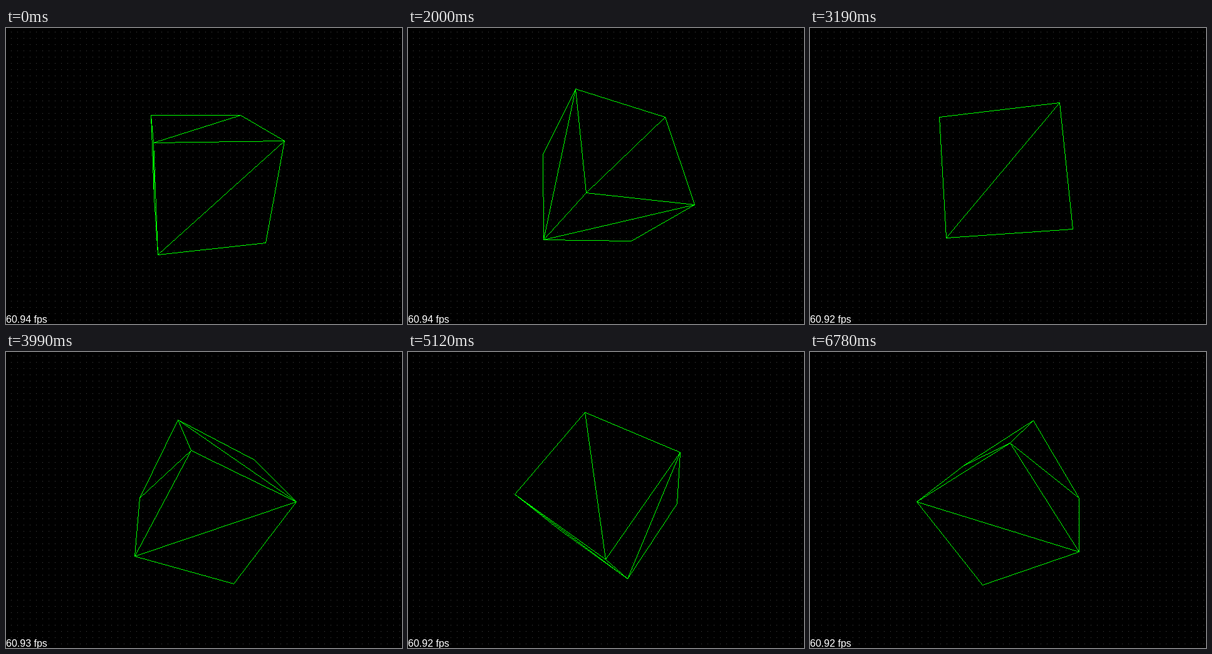
These frames come from a looping animation (632x473 px, 6.84 s). An HTML page with a canvas:

```html
<!DOCTYPE html>
<html lang="en">
<head>
<meta charset="utf-8">
<title>Wireframe cube</title>
<style>
  html, body { margin: 0; width: 100%; height: 100%; overflow: hidden; background: #000; }
  canvas { display: block; }
</style>
</head>
<body>
<canvas id="stage" width="632" height="473"></canvas>
<script>
const LOOP = 6840, STEPS = 103;
const FOCAL = 400, DISTANCE = 5, CENTER = { x: 318, y: 236 };
const ctx = document.getElementById('stage').getContext('2d');

// Vertex index bits pick the sign of x, y and z.
const VERTICES = Array.from({ length: 8 }, (_, i) => [1, 2, 4].map(bit => (i & bit ? 1 : -1)));

// Each quad is split along the diagonal from its first to its third corner.
const FACES = [
  [1, 0, 2, 3], [5, 1, 3, 7], [1, 0, 4, 5],
  [2, 3, 7, 6], [6, 4, 0, 2], [4, 5, 7, 6]
];

const FPS_LABELS = [
  [0, '60.94'], [970, '60.93'], [1470, '60.94'], [2500, '60.93'],
  [3000, '60.92'], [3530, '60.93'], [4060, '60.92']
];

const stepTime = n => 10 * Math.round(Math.min(70 * n, 16 + 66.2 * n) / 10);

function stepAt(time) {
  let n = Math.min(STEPS - 1, Math.floor(time / 66));
  while (n > 0 && stepTime(n) > time) n--;
  return n;
}

// The angle advances in hundredths of a radian.
const angleAt = n => n ? Math.round(110.4 + 0.0609 * stepTime(n)) / 100 : 1.09;

function rotate([x, y, z], angle) {
  const c = Math.cos(angle), s = Math.sin(angle);
  [y, z] = [y * c - z * s, y * s + z * c];
  [x, z] = [x * c + z * s, z * c - x * s];
  [x, y] = [x * c - y * s, x * s + y * c];
  return [x, y, z];
}

function project([x, y, z]) {
  const scale = FOCAL / (z + DISTANCE);
  return [Math.floor(CENTER.x + x * scale), Math.floor(CENTER.y + y * scale)];
}

function drawLine([x0, y0], [x1, y1]) {
  const dx = x1 - x0, dy = y1 - y0;
  const length = Math.max(Math.abs(dx), Math.abs(dy), 1);
  for (let i = 0; i <= length; i++) {
    ctx.fillRect(Math.round(x0 + dx * i / length), Math.round(y0 + dy * i / length), 1, 1);
  }
}

function drawGrid() {
  ctx.fillStyle = '#444';
  for (let y = 6; y < 473; y += 10) {
    for (let x = 8; x < 632; x += 10) ctx.fillRect(x, y, 1, 1);
  }
}

function drawCube(angle) {
  const rotated = VERTICES.map(v => rotate(v, angle));
  const points = rotated.map(project);
  ctx.fillStyle = '#0f0';
  for (const face of FACES) {
    const normalZ = face.reduce((sum, i) => sum + rotated[i][2], 0) / 4;
    if (1 + DISTANCE * normalZ >= 0) continue;
    const [a, b, c, d] = face.map(i => points[i]);
    for (const [p, q] of [[a, b], [b, c], [c, d], [d, a], [c, a]]) drawLine(p, q);
  }
}

function drawLabel(time) {
  const [, value] = FPS_LABELS.filter(([start]) => start <= time).pop();
  ctx.fillStyle = '#fff';
  ctx.font = '16px "Liberation Sans", Arial, sans-serif';
  ctx.fillText(value + ' fps', 0, 471);
}

function render(time) {
  const step = stepAt(time);
  ctx.fillStyle = '#000';
  ctx.fillRect(0, 0, 632, 473);
  drawGrid();
  drawCube(angleAt(step));
  drawLabel(stepTime(step));
}

const start = performance.now();
function tick() {
  render((performance.now() - start) % LOOP);
  requestAnimationFrame(tick);
}
tick();
</script>
</body>
</html>
```
